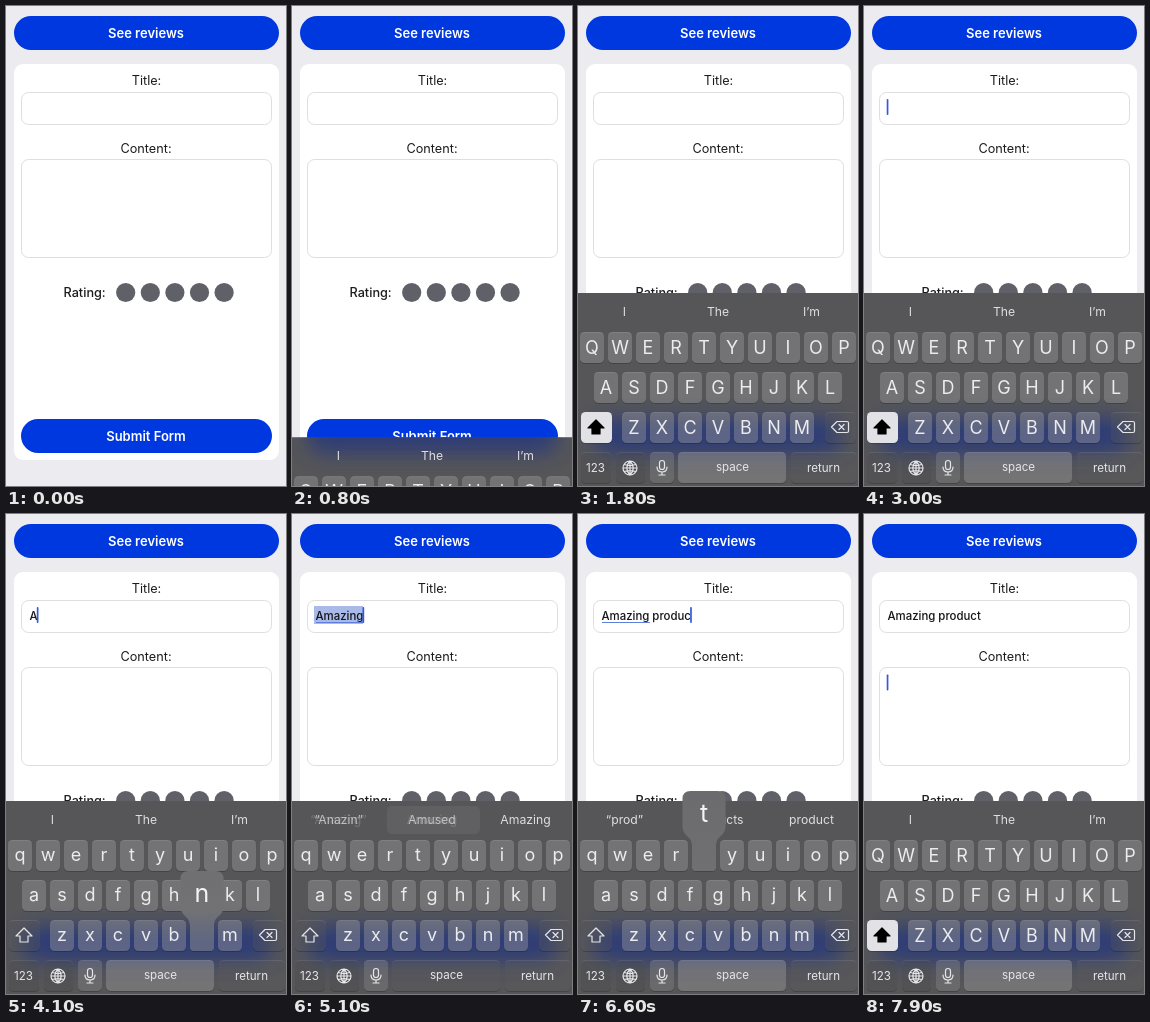
An HTML page that plays this animation: 280x480 px, repeating every 8000 ms.

```html
<!DOCTYPE html>
<html lang="en">
<head>
<meta charset="utf-8">
<title>Review form</title>
<style>
  html, body { margin: 0; width: 100%; height: 100%; overflow: hidden; background: #ececf0; }
  svg { display: block; width: 280px; height: 480px; font-family: Inter, Roboto, sans-serif; }
  text { white-space: pre; }
  .mid { text-anchor: middle; }
  .label { font-size: 12.7px; fill: #1c1c1f; }
  .button { font-size: 13px; font-weight: 600; fill: #fff; }
  .field { fill: #fff; stroke: #dedee1; }
  .key { font-size: 18px; fill: #ececee; }
  .small { font-size: 11.6px; fill: #e6e6e8; }
  .hint { font-size: 12.2px; fill: #dededf; }
  .icon { fill: none; stroke: #e6e6e8; stroke-width: 1.2; stroke-linecap: round; stroke-linejoin: round; }
</style>
</head>
<body>
<svg id="stage" viewBox="0 0 280 480">
  <defs>
    <filter id="blur" x="-20%" y="-120%" width="140%" height="340%"><feGaussianBlur stdDeviation="10"/></filter>
    <clipPath id="panel"><rect id="panelBox" width="280" height="480"/></clipPath>
    <linearGradient id="pop" gradientUnits="userSpaceOnUse" x1="0" y1="270" x2="0" y2="450">
      <stop offset="0" stop-color="#6b6b6e"/>
      <stop offset=".7" stop-color="#727275"/>
      <stop offset=".88" stop-color="#5e6682"/>
      <stop offset="1" stop-color="#5e6682"/>
    </linearGradient>
  </defs>
  <rect width="280" height="480" fill="#ececf0"/>
  <rect x="8" y="58" width="265" height="396" rx="9" fill="#fff"/>
  <rect x="8" y="10" width="265" height="34" rx="17" fill="#0038e0"/>
  <rect x="15" y="413" width="251" height="34" rx="17" fill="#0038e0"/>
  <text class="mid button" x="140" y="32">See reviews</text>
  <text class="mid button" x="140" y="435">Submit Form</text>
  <text class="mid label" x="140.5" y="79">Title:</text>
  <text class="mid label" x="140" y="146.5">Content:</text>
  <text class="label" x="57.5" y="291" font-weight="500">Rating:</text>
  <rect class="field" x="15.5" y="86.5" width="250" height="32" rx="7"/>
  <rect class="field" x="15.5" y="153.5" width="250" height="98" rx="7"/>
  <g id="dots" fill="#606068"></g>
  <rect id="mark" x="22" y="92" width="49" height="18" fill="#a9bae8"/>
  <text id="entry" x="23.5" y="106" font-size="11.4" font-weight="500" fill="#151518">Amazing</text>
  <rect id="line" x="24" y="108" height="1" fill="#5f7fdc"/>
  <rect id="caret" width="1.7" height="16" rx=".8" fill="#3558dc"/>
  <g clip-path="url(#panel)">
    <rect width="280" height="480" fill="#565659"/>
    <rect x="15" y="412" width="251" height="35" rx="17" fill="#26397c" opacity=".85" filter="url(#blur)"/>
  </g>
  <g id="board"></g>
</svg>
<script>
const LOOP = 8000, TOP = 287;
const NS = 'http://www.w3.org/2000/svg';
const $ = id => document.getElementById(id);
const clamp = v => Math.max(0, Math.min(1, v));

function add(parent, tag, attrs, text) {
  const el = parent.appendChild(document.createElementNS(NS, tag));
  set(el, attrs);
  if (text !== undefined) el.textContent = text;
  return el;
}
function set(el, attrs) {
  for (const k in attrs) el.setAttribute(k, attrs[k]);
}

const board = $('board'), entry = $('entry'), caret = $('caret');
for (let i = 0; i < 5; i++) add($('dots'), 'circle', { cx: 119.7 + i * 24.6, cy: 286.5, r: 9.6 });

function keyCap(x, y, w, light) {
  add(board, 'rect', { x, y: y + 1, width: w, height: 31, rx: 4.5, fill: '#000', opacity: .2 });
  return add(board, 'rect', { x, y, width: w, height: 31, rx: 4.5, fill: '#fff', 'fill-opacity': light });
}

// Letter rows
const keys = {};
['qwertyuiop', 'asdfghjkl', 'zxcvbnm'].forEach((row, r) => {
  [...row].forEach((ch, i) => {
    const cx = [14, 28, 56][r] + i * 28, y = 326 + r * 40;
    keyCap(cx - 12, y, 24, .25);
    keys[ch] = { cx, y, ch, label: add(board, 'text', { class: 'key mid', x: cx }) };
  });
});

// Function keys
const shift = keyCap(3, 406, 31, .1);
const arrow = add(board, 'path', { d: 'M18 414l8 8h-4v6h-8v-6h-4z', class: 'icon' });
keyCap(247, 406, 31, .1);
add(board, 'path', { d: 'M259 415.5h10q1.500 0 1.500 1.500v8q0 1.500-1.500 1.500h-10l-5.500-5.500zM261 418.500l5 5m0-5l-5 5', class: 'icon' });
keyCap(3, 446, 30, .08);
keyCap(38, 446, 29, .08);
keyCap(72, 446, 24, .2);
const space = keyCap(100, 446, 108, .25);
keyCap(213, 446, 66, .1);
add(board, 'text', { class: 'small mid', x: 17.5, y: 466 }, '123');
add(board, 'text', { class: 'small mid', x: 154.5, y: 465 }, 'space');
add(board, 'text', { class: 'small mid', x: 245.5, y: 466 }, 'return');
add(board, 'path', { class: 'icon', d: 'M45 462a7 7 0 1 0 14 0a7 7 0 1 0-14 0h14M52 455v14M52 455q-6.500 7 0 14q6.500-7 0-14M46.500 458.500q5.500 2 11 0M46.500 465.500q5.500-2 11 0' });
add(board, 'rect', { x: 81.5, y: 454.5, width: 5, height: 9, rx: 2.5, class: 'icon' });
add(board, 'path', { class: 'icon', d: 'M79 461q0 5 5 5t5-5M84 466v3M81 469h6' });

// Suggestion bar: one fading and one current text per slot
const hintBox = add(board, 'rect', { x: 95, y: 292, width: 93, height: 28, rx: 5, fill: '#fff', opacity: .06 });
const slots = [46.5, 140, 233.5].map(x =>
  [0, 1].map(() => add(board, 'text', { class: 'hint mid', x, y: 310 })));
const HINTS = [
  [0, 'I', 'The', 'I’m'],
  [4290, '“An”', 'And', 'Any'],
  [4490, '“Ana”', 'Analysis', 'Animal'],
  [4690, '“Anaz”', 'Amaze', 'Amazing'],
  [4850, '“Anazin”', 'Amused', 'Amazing'],
  [5050, '“Anazing”', 'Amazing', 'Amazing'],
  [5250, 'and', 'product', 'service'],
  [5790, '“p”', 'price', 'product'],
  [6090, '“pro”', 'product', 'products'],
  [6340, '“prod”', 'products', 'product'],
  [6690, '“product”', 'products', 'production'],
  [7490, 'I', 'The', 'I’m']
];

const popup = add(board, 'g', {});
const bubble = add(popup, 'path', { fill: 'url(#pop)' });
const popLetter = add(popup, 'text', { class: 'mid', 'font-size': 25, fill: '#f4f4f5' });

const HOLD = 90, FIX = 5090, SPACE = 5290, FOCUS = 7490;
const PRESSES = [
  [3990, 'A'], [4090, 'n'], [4290, 'a'], [4490, 'z'], [4590, 'i'], [4690, 'n'], [4890, 'g'],
  [5690, 'p'], [5890, 'r'], [5990, 'o'], [6190, 'd'], [6290, 'u'], [6490, 'c'], [6590, 't']
];
const lineWidth = entry.getComputedTextLength();

function typed(t) {
  const chars = PRESSES.filter(p => t >= p[0] + HOLD).map(p => p[1]).join('');
  if (t < FIX) return chars;
  return 'Amazing' + (t < SPACE ? '' : ' ') + chars.slice(7);
}

function drawPopup(t) {
  const hit = PRESSES.find(p => t >= p[0] && t < p[0] + HOLD);
  popup.setAttribute('display', hit ? 'inline' : 'none');
  if (!hit) return;
  const { cx, y } = keys[hit[1].toLowerCase()];
  const l = Math.max(1, Math.min(235, cx - 21.5)), r = l + 43;
  const a = cx - 12, b = cx + 12;
  bubble.setAttribute('d',
    `M${l + 8} ${y - 49}H${r - 8}q8 0 8 8V${y - 14}C${r} ${y - 3} ${b} ${y - 5} ${b} ${y + 6}` +
    `V${y + 27}q0 4-4 4H${a + 4}q-4 0-4-4V${y + 6}C${a} ${y - 5} ${l} ${y - 3} ${l} ${y - 14}V${y - 41}q0-8 8-8z`);
  set(popLetter, { x: (l + r) / 2, y: y - 18 });
  popLetter.textContent = hit[1];
}

function drawHints(t) {
  let n = HINTS.length - 1;
  while (t < HINTS[n][0]) n--;
  const now = HINTS[n], old = HINTS[Math.max(0, n - 1)];
  const p = clamp((t - now[0]) / 220);
  slots.forEach(([from, to], i) => {
    const same = now[i + 1] === old[i + 1];
    from.textContent = old[i + 1];
    to.textContent = now[i + 1];
    from.setAttribute('opacity', same ? 0 : 1 - p);
    to.setAttribute('opacity', same ? 1 : p);
  });
  hintBox.setAttribute('display', t >= 4690 && t < 5250 ? 'inline' : 'none');
}

function drawKeys(t) {
  const caps = t < 4080 || t >= FOCUS;
  for (const ch in keys) {
    const { label, y } = keys[ch];
    label.textContent = caps ? ch.toUpperCase() : ch;
    label.setAttribute('y', y + (caps ? 22 : 20.5));
  }
  set(shift, { fill: caps ? '#e2e2e6' : '#fff', 'fill-opacity': caps ? 1 : .1 });
  set(arrow, { style: caps ? 'fill:#000;stroke:#000' : '' });
  space.setAttribute('fill-opacity', t >= 5040 && t < 5190 ? .1 : .25);
}

// Solid while typing, then fades out once a second
function caretAlpha(t) {
  if (t < 850) return 0;
  const resets = [950, ...PRESSES.map(p => p[0] + HOLD), SPACE, FOCUS - 40];
  const last = resets.filter(s => s <= t).pop();
  if (last === undefined || (t >= 3990 && t < 4080)) return 1;
  const p = (t - last) % 1000;
  return Math.max(clamp((850 - p) / 150), clamp((p - 950) / 50));
}

function draw(t) {
  const x = Math.max(0, t - 750) * .019;
  const dy = (480 - TOP) * (1 + x) * Math.exp(-x);
  board.setAttribute('transform', `translate(0 ${dy.toFixed(2)})`);
  $('panelBox').setAttribute('y', TOP + dy);

  entry.textContent = typed(t);
  const inBody = t >= FOCUS;
  const w = entry.textContent ? entry.getComputedTextLength() : 0;
  set(caret, {
    x: inBody ? 22.7 : 22.7 + w,
    y: inBody ? 160.5 : 93,
    opacity: caretAlpha(t)
  });
  $('mark').setAttribute('opacity', t >= FIX ? clamp((5390 - t) / 150) : 0);
  set($('line'), { width: lineWidth, opacity: t >= FIX && t < FOCUS ? 1 : 0 });
  drawKeys(t);
  drawHints(t);
  drawPopup(t);
}

const start = performance.now();
function tick() {
  draw((performance.now() - start) % LOOP);
  requestAnimationFrame(tick);
}
tick();
</script>
</body>
</html>
```
